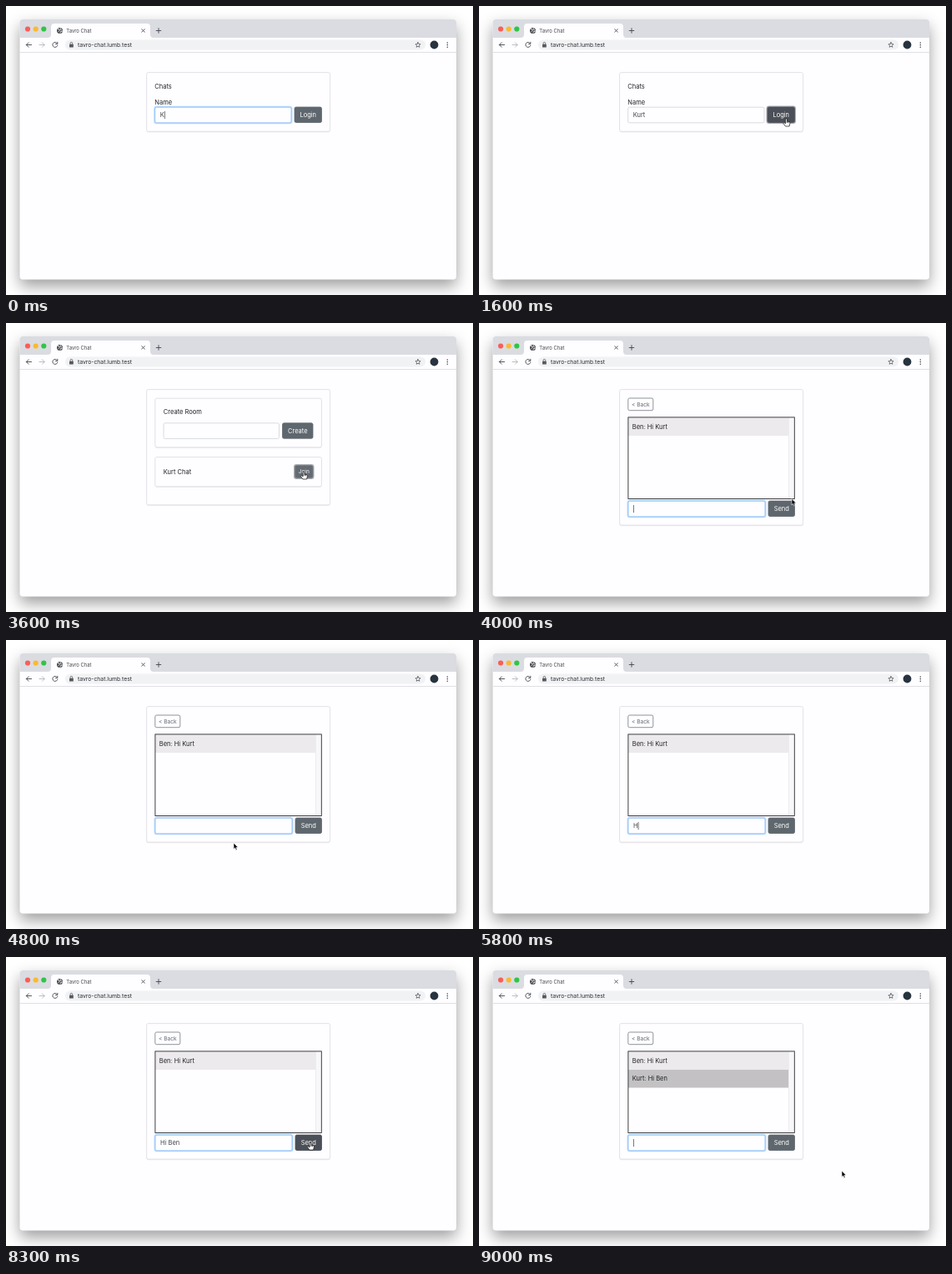
Write an HTML page that moves like this. It is 560x346 px and loops after 9.1 s.

```html
<!DOCTYPE html>
<html lang="en">
<head>
<meta charset="utf-8">
<title>Chat</title>
<style>
html, body { margin: 0; width: 100%; height: 100%; overflow: hidden; background: #fff; }
svg { display: block; }
text { font-family: Inter, "Open Sans", sans-serif; white-space: pre; }
#window { filter: drop-shadow(0 8px 9px rgba(0, 0, 0, .38)); }
.line { fill: none; stroke: #45484d; stroke-linecap: round; stroke-linejoin: round; }
</style>
</head>
<body>
<svg width="560" height="346" viewBox="0 0 560 346">
  <g id="window"><rect x="16.5" y="16" width="523.5" height="311.5" rx="4" fill="#fefdff"/></g>
  <path d="M16.5 38V20q0-4 4-4H536q4 0 4 4V38z" fill="#dadce1"/>
  <path d="M50 38q4 0 4-4V25q0-4 4-4H169q4 0 4 4V34q0 4 4 4z" fill="#fefdff"/>
  <path d="M16.5 55.5H540" stroke="#d9d9de" stroke-width=".8"/>
  <circle cx="26" cy="27.5" r="3.1" fill="#f95e57"/>
  <circle cx="35.7" cy="27.5" r="3.1" fill="#fbb92f"/>
  <circle cx="45.3" cy="27.5" r="3.1" fill="#30c546"/>
  <circle cx="64.5" cy="29.5" r="3.5" fill="#45484d"/>
  <path d="M62 27.5l2 .4.3 1.6-1.5 1M65.5 26.8l-.3 1.2 2 1.2M65 32l.6-1.6 1.6.2" class="line" style="stroke:#fff" stroke-width=".8"/>
  <path d="M162.8 27.8l3.4 3.4M166.2 27.8l-3.4 3.4M183 26.7v5.6M180.2 29.5h5.6" class="line" stroke-width=".9"/>
  <rect x="71" y="40.5" width="432" height="12" rx="6" fill="#f0f2f4"/>
  <path d="M30.5 46.5H24.5M27 43.8l-2.7 2.7 2.7 2.7M61.3 44.6A3 3 0 1 0 61.8 47.2M61.8 43.3V45.5H59.6" class="line" stroke-width=".9"/>
  <path d="M40 46.5H46M43.5 43.8l2.7 2.7-2.7 2.7" class="line" style="stroke:#b4b6ba" stroke-width=".9"/>
  <rect x="76" y="45.7" width="4.8" height="3.8" rx=".6" fill="#55585d"/>
  <path d="M77.1 45.6V44.7a1.3 1.3 0 0 1 2.6 0v.9" class="line" stroke-width=".7"/>
  <path d="M494 43.5l.9 2 2.2.2-1.7 1.5.5 2.1-1.9-1.1-1.9 1.1.5-2.1-1.7-1.5 2.2-.2z" class="line" stroke-width=".7"/>
  <circle cx="513.5" cy="46.5" r="4.9" fill="#27343f"/>
  <g fill="#45484d">
    <circle cx="529.3" cy="44" r=".8"/><circle cx="529.3" cy="46.6" r=".8"/><circle cx="529.3" cy="49.2" r=".8"/>
    <text x="72.3" y="31.7" font-size="5.9">Tavro Chat</text>
    <text x="86" y="49" font-size="6.8" fill="#2b2d31">tavro-chat.lumb.test</text>
  </g>
  <g id="page"></g>
</svg>
<script>
const LOOP = 9100, STEP = 100;
const page = document.getElementById('page');
const pen = document.createElement('canvas').getContext('2d');

// Times at which the caret restarts its blink
const resets = [0, 200, 300, 1800, 3900, 5800, 6000, 6200, 6400, 6500, 6700, 8600];
// Pointer tracks: [time, x, y]
const tracks = [
  [[900, 386, 221], [1300, 368.5, 135], [1700, 368.5, 135], [2200, 380, 234.5], [2400, 380, 236],
   [2700, 361, 188], [2900, 357, 178], [3800, 357, 178], [4000, 375, 210.5], [4300, 371, 237],
   [4800, 273, 243], [5100, 258, 231], [5300, 258, 231], [5600, 257, 228], [5800, 257, 228]],
  [[7300, 318, 289], [8100, 366, 233], [8300, 365, 222], [8600, 365, 222], [9000, 435, 256], [9100, 435, 256]]
];
const buttons = [
  { x: 346, y: 121, w: 32.5, h: 18.5, label: 'Login', press: 1500 },
  { x: 346.5, y: 170.5, w: 21.5, h: 15, label: 'Join', press: 3600, outline: true },
  { x: 347, y: 213, w: 31.5, h: 18.5, label: 'Send', press: 8500 }
];
const fields = [
  { x: 178.7, y: 121.2, w: 163.3, h: 18.6 },
  { x: 189, y: 119.8, w: 138.5, h: 18.6 },
  { x: 179, y: 213.2, w: 164, h: 18.6 }
];
const create = { x: 331.5, y: 119.8, w: 36.5, h: 18.4, label: 'Create' };
const back = { x: 178.8, y: 90, w: 30, h: 14.7, label: '< Back', outline: true };

const rect = (x, y, w, h, fill, more = '') =>
  `<rect x="${x}" y="${y}" width="${w}" height="${h}" fill="${fill}" ${more}/>`;
const text = (x, mid, s, fill = '#212327', size = 7.5, more = '') =>
  `<text x="${x}" y="${mid + size * .36}" font-size="${size}" fill="${fill}" ${more}>${s.replace('<', '&lt;')}</text>`;
const ring = (b, color) =>
  rect(b.x - .7, b.y - .7, b.w + 1.4, b.h + 1.4, 'none', `rx="2.4" stroke="${color}" stroke-width="1.6"`);
const card = (x, y, w, h) =>
  rect(x, y + 1.2, w, h, '#000', 'rx="2" opacity=".06"') +
  rect(x, y, w, h, '#fefdff', 'rx="2" stroke="#dcdbe0" stroke-width=".8"');
const within = (b, p) => p && p.x >= b.x && p.x <= b.x + b.w && p.y >= b.y && p.y <= b.y + b.h;
const typed = (s, times, t) => s.slice(0, times.filter(k => t >= k).length);

function button(b, hover, focus) {
  const fill = b.outline ? (hover ? '#646b73' : '#fefdff') : hover ? '#4b4f57' : '#5f676e';
  const ink = b.outline && !hover ? '#5f666e' : '#fff';
  return (focus ? ring(b, '#abadb3') : '') +
    rect(b.x, b.y, b.w, b.h, fill, `rx="1.8" stroke="${b.outline ? '#737a82' : fill}" stroke-width=".8"`) +
    text(b.x + b.w / 2, b.y + b.h / 2, b.label, ink, b.outline ? 6.6 : 7.5, 'text-anchor="middle"');
}

function field(f, value, focus, caret) {
  pen.font = '7.5px Inter, "Open Sans", sans-serif';
  const mid = f.y + f.h / 2, x = f.x + 6;
  return (focus ? ring(f, '#bcdcfd') : '') +
    rect(f.x, f.y, f.w, f.h, '#fefdff', `rx="1.9" stroke="${focus ? '#80b9f7' : '#cfd3d9'}" stroke-width=".8"`) +
    text(x, mid, value, '#43474d') +
    (focus && caret ? rect(x + pen.measureText(value).width + .2, mid - 4.6, .6, 9.2, '#222') : '');
}

function pointerAt(t) {
  const track = tracks.find(k => t >= k[0][0] && t < k[k.length - 1][0]);
  if (!track) return null;
  const i = track.findIndex(k => k[0] > t), [t0, x0, y0] = track[i - 1], [t1, x1, y1] = track[i];
  const u = (t - t0) / (t1 - t0), e = u * u * (3 - 2 * u);
  return { x: x0 + (x1 - x0) * e, y: y0 + (y1 - y0) * e };
}

function cursor(p, kind) {
  const shape = {
    arrow: '<path d="M0 0V7.4L1.7 5.8 2.8 8.4 4.1 7.9 3 5.3H5.2z" fill="#000" stroke="#fff" stroke-width=".6"/>',
    hand: '<path d="M-.9.4Q0-.6.9.4V3L3.6 3.7Q4.7 4.1 4.4 5.6L3.6 9H-1L-3.6 5.6Q-3.6 4.2-2.3 4.8L-.9 5.8zM.9 3V5M2.6 3.6V5.2" fill="#fff" stroke="#111" stroke-width=".7"/>',
    beam: '<path d="M-1.7-5Q0-5 0-4Q0-5 1.7-5M0-4V4M-1.7 5Q0 5 0 4Q0 5 1.7 5" fill="none" stroke="#222" stroke-width=".8"/>'
  }[kind];
  return `<g transform="translate(${p.x} ${p.y})">${shape}</g>`;
}

const screens = [
  () => card(168.6, 79.6, 220, 70.6) + text(178.3, 96, 'Chats') + text(178.3, 115.2, 'Name'),
  () => card(168.6, 79.6, 220, 138.2) + card(178.8, 90.2, 199.6, 58.6) + card(178.8, 160.6, 199.6, 35.2) +
    text(188.8, 106, 'Create Room') + text(188.8, 178.6, 'Kurt Chat'),
  t => card(168.6, 79.6, 220, 162.4) +
    rect(371, 113, 7, 97.5, '#f8f7f9') + rect(371, 113, .6, 97.5, '#e4e3e6') +
    rect(179, 113, 192, 22, '#eceaec') + text(183.8, 124.2, 'Ben: Hi Kurt') +
    (t >= 8600 ? rect(179, 135, 192, 21.5, '#c3c1c3') + text(183.8, 145.7, 'Kurt: Hi Ben') : '') +
    rect(178.9, 112.9, 199.4, 97.6, 'none', 'stroke="#2a2a2d" stroke-width=".9"')
];

function draw(t) {
  const n = t < 1800 ? 0 : t < 3900 ? 1 : 2;
  const b = buttons[n], f = fields[n], p = pointerAt(t);
  const pressed = t >= b.press && !(n === 2 && t >= 8600);
  const caret = (t - resets.filter(r => r <= t).pop()) % 1000 < 500;
  const value = n === 0 ? typed('Kurt', [0, 200, 200, 300], t)
    : n === 2 && t < 8600 ? typed('Hi Ben', [5800, 6000, 6200, 6400, 6500, 6700], t) : '';
  const extra = [null, create, back][n];
  const all = extra ? [b, extra] : [b];
  const kind = all.some(k => within(k, p)) ? 'hand' : within(f, p) ? 'beam' : 'arrow';
  page.innerHTML = screens[n](t) + field(f, value, !pressed, caret) +
    all.map(k => button(k, within(k, p), k === b && pressed)).join('') +
    (p ? cursor(p, kind) : '');
}

const start = performance.now();
let shown = -1;
function tick() {
  const t = Math.floor((performance.now() - start) % LOOP / STEP) * STEP;
  if (t !== shown) draw(shown = t);
  requestAnimationFrame(tick);
}
tick();
</script>
</body>
</html>
```
